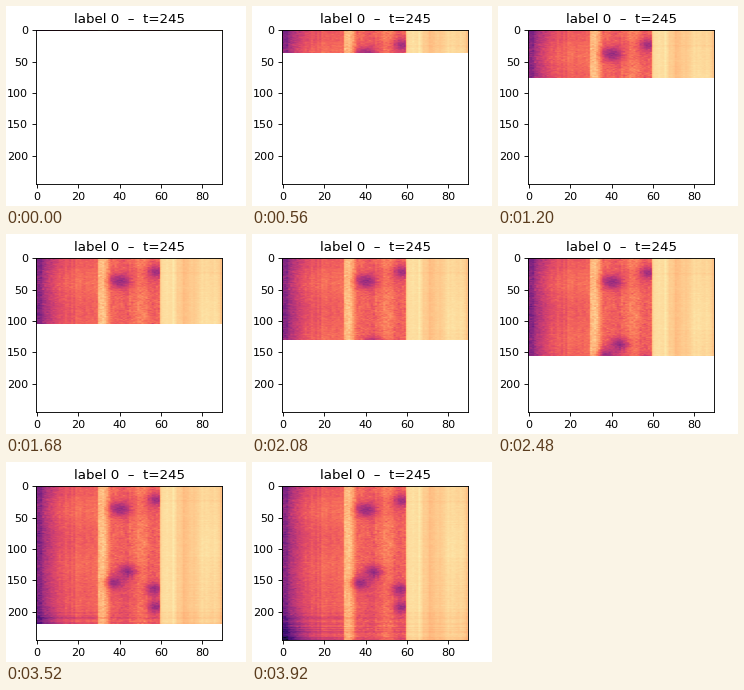
Animation of 240x200 px, one loop 4000 ms. Source, as a matplotlib script:

```python
import numpy as np
import matplotlib.pyplot as plt
from matplotlib.animation import FuncAnimation

FRAMES, STEP = 50, 5
ROWS = STEP * (FRAMES - 1) + 1
BAND = 30
COLS = 3 * BAND

rng = np.random.default_rng(7)
row = np.arange(ROWS)[:, None]
col = np.arange(BAND)[None, :]


def bump(x, y, width, height):
    """Gaussian centred on a column and a row."""
    return np.exp(-((col - x) / width) ** 2 - ((row - y) / height) ** 2)


def grain(pixel, streak):
    """Pixel noise plus faint vertical and horizontal streaks."""
    return (rng.normal(0, pixel, (ROWS, BAND))
            + rng.normal(0, streak, (1, BAND))
            + rng.normal(0, streak / 2, (ROWS, 1)))


def make_left():
    edge = np.exp(-(col / 8) ** 1.5)
    base = 0.68 - 0.30 * edge
    wave = 0.03 * np.cos((row - 42) / 14) * np.exp(-row / 150)
    corner = bump(0, ROWS, 12, 30)
    return base + wave - 0.15 * corner + grain(0.02, 0.012) * (1 + edge)


def make_middle():
    strip = np.exp(-(col / 5) ** 4)
    ridge = np.exp(-((col - 20) / 4) ** 2)
    base = 0.66 + 0.21 * strip + 0.08 * ridge
    spots = [(10, 38), (28, 23), (14, 137), (7, 155), (27, 165), (28, 193)]
    dips = sum(bump(x, y, 4.5, 10) for x, y in spots)
    haze = bump(15, 35, 12, 20) + bump(15, 165, 14, 35)
    return base - 0.21 * dips - 0.05 * haze + grain(0.03, 0.01)


def make_right():
    ripple = 0.04 * np.cos(2 * np.pi * (col - 4) / 18) * np.exp(-col / 40)
    glow = 0.02 * bump(25, 95, 8, 50)
    return 0.90 + ripple + glow + grain(0.006, 0.008)


data = np.hstack([make_left(), make_middle(), make_right()])

# horizontal lines that set in near the end of the record
onset = 1 / (1 + np.exp((200 - row) / 4))
lines = onset * np.abs(rng.normal(0, 0.08, (ROWS, 1)))
data -= lines * np.repeat([1, 0.6, 0.25], BAND)
data = np.clip(data, 0, 1)

fig, ax = plt.subplots(figsize=(3, 2.5), dpi=80)
image = ax.imshow(data, cmap="magma", vmin=0, vmax=1, aspect="auto")
ax.set_autoscale_on(False)
ax.set_xticks(range(0, COLS, 20))
ax.set_yticks(range(0, ROWS, 50)[:5])
ax.set_title(f"label 0  –  t={ROWS - 1}")


def update(k):
    shown = STEP * k + 1
    image.set_data(data[:shown])
    image.set_extent((-0.5, COLS - 0.5, shown - 0.5, -0.5))
    return [image]


anim = FuncAnimation(fig, update, frames=FRAMES, interval=80,
                     repeat=True, repeat_delay=0, blit=False)
plt.show()
```
